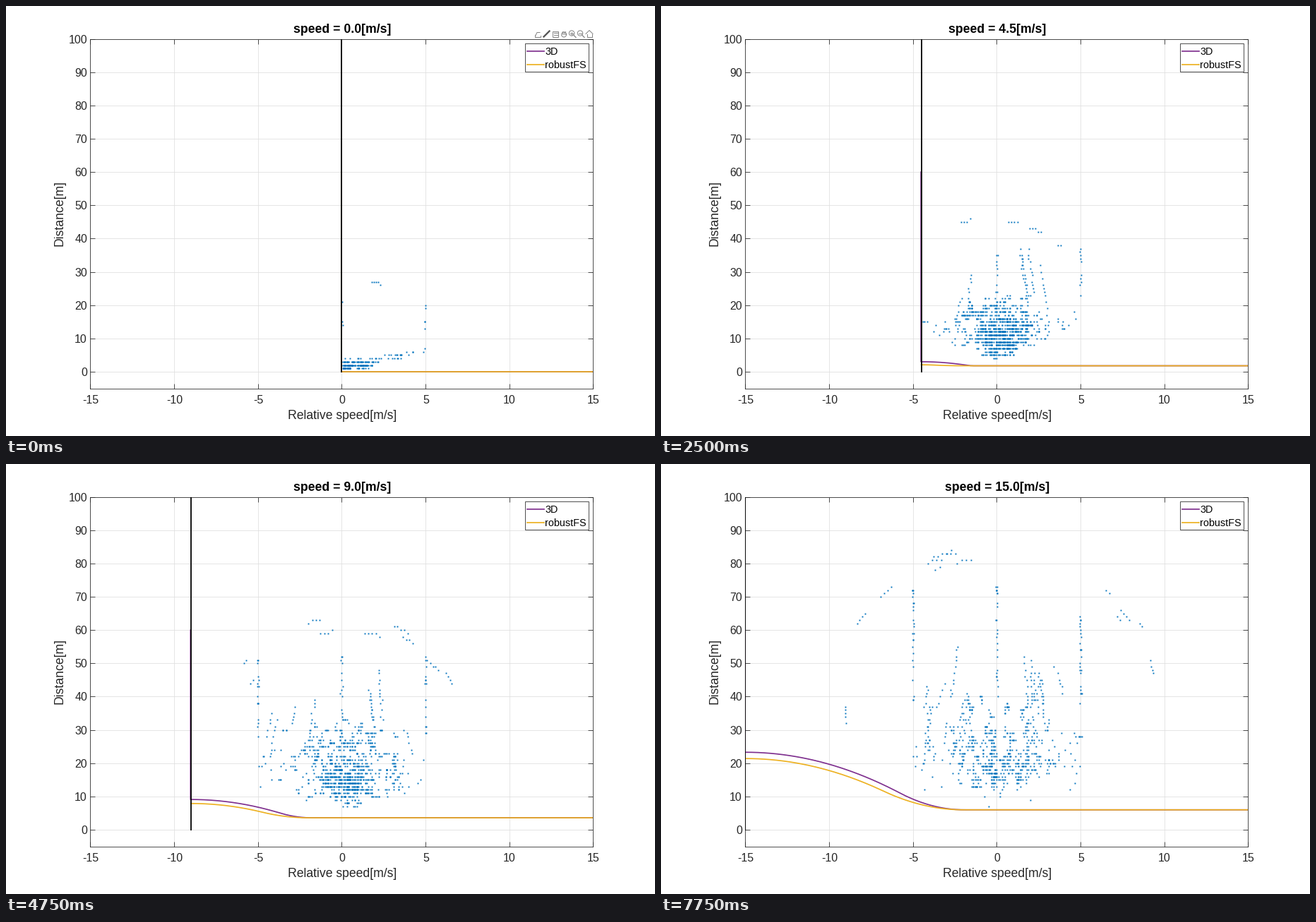
Animation of 919 by 609 pixels, one loop 8 s. Source, as a matplotlib script:

```python
import numpy as np
import matplotlib.pyplot as plt
from matplotlib.animation import FuncAnimation
from matplotlib.patches import Circle, Rectangle

W, H, DPI = 919, 609, 64
PX = 72 / DPI                      # points per pixel
FRAMES, INTERVAL = 32, 250
LEFT, RIGHT, TOP, BOTTOM = 119.4, 831.4, 46.6, 541.6
INK, BLUE, PURPLE, YELLOW = "#262626", "#0072BD", "#7E2F8E", "#EDB120"
plt.rcParams["font.family"] = "Liberation Sans"

fig = plt.figure(figsize=(W / DPI, H / DPI), dpi=DPI, facecolor="white")
ax = fig.add_axes([LEFT / W, 1 - BOTTOM / H, (RIGHT - LEFT) / W, (BOTTOM - TOP) / H])
ax.set(xlim=(-15, 15), ylim=(-5, 100), xticks=range(-15, 16, 5), yticks=range(0, 101, 10))
ax.set_axisbelow(True)
ax.grid(color="#DFDFDF", lw=0.8 * PX)
ax.tick_params(direction="in", top=True, right=True, length=7 * PX, width=0.8 * PX,
               color=INK, labelbottom=False, labelleft=False)
for spine in ax.spines.values():
    spine.set(color=INK, linewidth=0.8 * PX)

# Overlay in pixel coordinates for text, legend and toolbar.
over = fig.add_axes([0, 0, 1, 1], facecolor="none")
over.set(xlim=(0, W), ylim=(H, 0))
over.axis("off")


def label(x, y, text, size=16, ha="center", color=INK, **kw):
    return over.text(x, y, text, fontsize=size * PX, ha=ha, va="baseline", color=color,
                     rotation_mode="anchor", **kw)


for value in range(-15, 16, 5):
    label(475.7 + value * (RIGHT - LEFT) / 30, 563, str(value))
for value in range(0, 101, 10):
    label(115, 524 - value * (BOTTOM - TOP) / 105, str(value), ha="right")
label(475.7, 585, "Relative speed[m/s]", 17.6)
label(81, 294, "Distance[m]", 17.6, rotation=90)
title = label(475.7, 38, "", 17.6, color="black", weight="bold")

over.add_patch(Rectangle((735.2, 52.6), 90, 40, fc="white", ec=INK, lw=0.8 * PX))
for y, color, name in ((63.5, PURPLE, "3D"), (82.8, YELLOW, "robustFS")):
    over.plot([737.5, 761.5], [y, y], color=color, lw=1.7 * PX)
    label(763.5, y + 5.5, name, 14.4, ha="left", color="black")


def draw_toolbar():
    gray, y = "#858585", 39.5
    parts = []

    def stroke(cx, points, width=1, color=gray):
        xs, ys = zip(*points)
        parts.extend(over.plot(np.add(cx, xs), np.add(y, ys), color=color, lw=width * PX))

    def box(cx, half):
        parts.append(over.add_patch(Rectangle((cx - half, y - half), 2 * half, 2 * half,
                                              fill=False, ec=gray, lw=PX)))

    def ring(cx, cy, radius):
        parts.append(over.add_patch(Circle((cx, cy), radius, fill=False, ec=gray, lw=PX)))

    stroke(753, [(-4, 1), (-4, 4), (4, 4), (4, 2)])              # export
    stroke(753, [(-3, 2), (-1, -2), (3, -2)])
    stroke(765.5, [(-4, 4), (4, -4)], 2.3, "#555555")            # brush
    box(778, 4)                                                  # data tips
    for dy in (-1.5, 1.5):
        stroke(778, [(-2, dy), (3, dy)])
    ring(790, y + 1, 3.5)                                        # pan
    for dx in (-2, 0, 2):
        stroke(790 + dx, [(0, -4), (0, 0)])
    for cx in (802, 814):                                        # zoom
        ring(cx - 1, y - 1, 3.7)
        stroke(cx, [(2, 2), (5, 5)], 1.3)
        stroke(cx, [(-3, -1), (1, -1)])
    stroke(802, [(-1, -3), (-1, 1)])
    stroke(826, [(-5, 0), (0, -5), (5, 0)])                      # home
    stroke(826, [(-3.5, 0), (-3.5, 4), (3.5, 4), (3.5, 0)])
    return parts


toolbar = draw_toolbar()
dots, = ax.plot([], [], "s", color=BLUE, ms=1.9 * PX, mew=0, zorder=3)
purple, = ax.plot([], [], color=PURPLE, lw=1.7 * PX, zorder=4)
yellow, = ax.plot([], [], color=YELLOW, lw=1.7 * PX, zorder=5)
limit, = ax.plot([], [], color="black", lw=1.8 * PX, zorder=6)


def safety_curve(v, rise, end, bend=0.144):
    """Parabola falling from x = -v that lands smoothly on the level 0.4 v at x = end."""
    x = np.linspace(-v, 15, 400)
    y = np.full_like(x, 0.4 * v)
    span = v + end
    if rise > 0.01 and span > 0.1:
        s = x + v
        join = min(rise / (bend * span), 0.97 * span)
        k = (rise - bend * join ** 2) / (span - join) ** 2
        y += np.where(s < join, rise - bend * s ** 2, k * np.clip(span - s, 0, None) ** 2)
    return x, y


def with_stem(x, y):
    return np.r_[x[0] - 0.02, x[0] - 0.02, x], np.r_[60, y[0], y]


def core_shape(v):
    """Lowest, most common and highest distance of the dense cloud."""
    low = 0.5 + 0.6 * v
    return low, low + 1 + 6 * (1 - np.exp(-v / 2)), 4 + 44 * (1 - np.exp(-v / 8))


def core(v, rng):
    """Many short walks, flat at low speed and climbing at high speed."""
    low, mode, high = core_shape(v)
    steps = 2 + int(v / 3.5)
    walks = int(170 + 350 * v * np.exp(-v / 5.5)) // steps
    y = rng.triangular(low, mode, high, walks)
    spread = 0.4 + 0.6 * np.minimum(1, (y - low) / (0.4 * (high - low)))
    x = rng.normal(0.15, (0.85 + 0.07 * v) * spread)
    if v == 0:
        x = np.abs(x)
    dx = rng.normal(0, 0.11, (steps, walks)).cumsum(axis=0)
    dy = (rng.random((steps, walks)) < 0.05 + 0.035 * v).cumsum(axis=0)
    return np.round((x + dx).ravel(), 1), (y + dy).ravel()


def fringe(v, rng):
    """Thin spill on both sides, rising away from the middle."""
    x = rng.uniform(-5, 5, 80)
    return x, core_shape(v)[1] + np.abs(x) + rng.normal(0, 0.5 + 0.3 * v, 80)


def wall(v, rng, x):
    n = int(5 + 1.3 * v)
    return rng.normal(x, 0.03, n), rng.uniform(13 + 1.6 * v, 22 + 3.4 * v, n)


def column(v, rng):
    """Upright trace beside the cloud, leaning towards the middle."""
    low, mode, high = core_shape(v)
    n = rng.integers(5, 13)
    side = rng.choice([-1, 1])
    x = side * (rng.uniform(1.4, 4.5) - np.linspace(0, rng.uniform(0, 0.5), n))
    y = rng.uniform(mode, high) + rng.integers(1, 3, n).cumsum()
    return x + rng.normal(0, 0.04, n), y


def far_run(v, rng):
    """Short run along the arch that marks the farthest echoes."""
    angle = rng.uniform(0, np.pi) + 0.03 * np.arange(rng.integers(2, 6))
    x = (5 + 0.3 * v) * np.cos(angle)
    y = (28 + 3.6 * v) * (0.5 + 0.5 * np.sin(angle))
    return x + rng.normal(0, 0.3), y + rng.normal(0, 2)


def scene_points(v):
    rng = np.random.default_rng(40 + round(2 * v))
    parts = [core(v, rng), fringe(v, rng)]
    parts += [wall(v, rng, x) for x in (-5, 0, 5)]
    parts += [column(v, rng) for _ in range(int(2 + v))]
    parts += [far_run(v, rng) for _ in range(int(3 + 0.7 * v))]
    x, y = (np.concatenate(axis) for axis in zip(*parts))
    y = np.round(y)
    keep = (x >= -v) & (y > 0.4 * v)
    return x[keep], y[keep]


def update(frame):
    v = max(0, frame - 1) / 2
    title.set_text(f"speed = {v:.1f}[m/s]")
    for part in toolbar:
        part.set_visible(frame < 2)
    dots.set_data(*scene_points(v))

    high_rise = max(0.0903 * v * v - 0.202 * v, 0.06 * v * v)
    low_rise = max(0.0915 * v * v - 0.346 * v, 0)
    high = safety_curve(v, high_rise, -2 * (1 - np.exp(-v / 4)))
    low = safety_curve(v, low_rise, -2)
    purple.set_data(*with_stem(*high))
    yellow.set_data(*(with_stem(*low) if v == 0 else low))
    limit.set_data([-v, -v], [0, 100])
    return [title, dots, purple, yellow, limit, *toolbar]


anim = FuncAnimation(fig, update, frames=FRAMES, interval=INTERVAL, repeat=True,
                     repeat_delay=0, blit=False)
plt.show()
```
